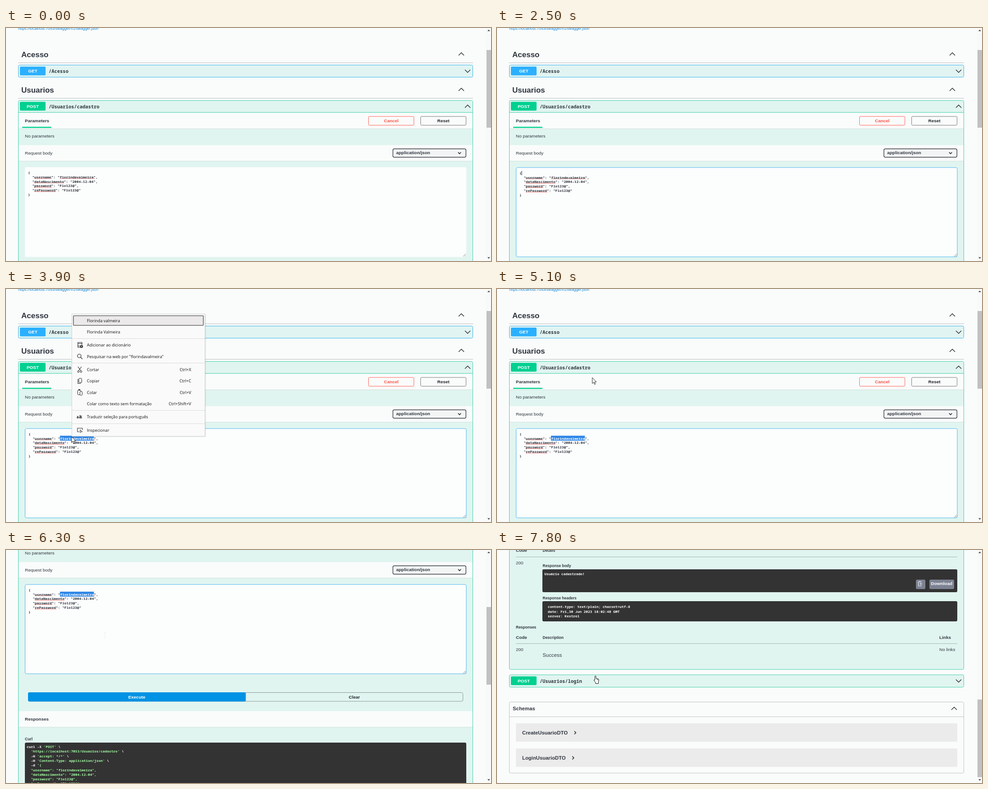
An HTML page that plays this animation: 1079 by 519 pixels, repeating every 8000 ms.

```html
<!DOCTYPE html>
<html lang="pt">
<head>
<meta charset="utf-8">
<title>Usuarios</title>
<style>
  html, body { margin: 0; width: 100%; height: 100%; overflow: hidden; background: #fafbfb; }
  svg { display: block; }
  text { white-space: pre; font: 9.95px "Liberation Sans", sans-serif; fill: #30363f; }
  .b { font-weight: 700; }
  .small { font-size: 8.5px; font-weight: 700; }
  .large { font-size: 11.35px; }
  .title { font-size: 17px; font-weight: 700; }
  .path { font: 600 10.46px "Noto Sans Mono", monospace; }
  .code { font: 600 7.83px "Noto Sans Mono", monospace; }
  .menu { font: 9.1px "Open Sans", sans-serif; fill: #111; }
  .white { fill: #fff; }
  .green { fill: #a2fca2; }
</style>
</head>
<body>
<script>
const LOOP = 8000, STEP = 100;
const INK = '#22262b', PAPER = '#fafcfb', GREEN = '#00d090', EDGE = '#3fcfaa', MINT = '#e1f5f0', BLUE = '#2bb0ff', DARK = '#333';
const CHAR = 4.7;
const USER = 'florindavalmeira';

// Drawing helpers, each returns markup
const text = (x, y, str, cls = '', extra = '') => `<text x="${x}" y="${y}" class="${cls}" ${extra}>${str}</text>`;
const centered = (x, y, str, cls = 'b', color = INK) => text(x, y, str, cls, `text-anchor="middle" style="fill:${color}"`);
const box = (x0, y0, x1, y1, fill, stroke = '', r = 0, w = 1) => {
  const i = stroke ? w / 2 : 0;
  return `<rect x="${x0 + i}" y="${y0 + i}" width="${x1 - x0 - 2 * i}" height="${y1 - y0 - 2 * i}" rx="${r}" fill="${fill}"` +
    (stroke ? ` stroke="${stroke}" stroke-width="${w}"/>` : '/>');
};
const rule = (x0, x1, y, color) => box(x0, y, x1, y + 1, color);
const line = (d, w = 1.3, color = INK) => `<path d="${d}" fill="none" stroke="${color}" stroke-width="${w}"/>`;
const chevron = (x, y, dir, s = 6, w = 1.4) => line(`M${x - s} ${y - dir * s / 2}l${s} ${dir * s} ${s} ${-dir * s}`, w);
const group = (id, content) => `<g id="${id}">${content}</g>`;

const section = (name, y) => text(34, y, name, 'title') + rule(27, 1039, y + 12, '#b9bfbf') + chevron(1013, y - 7, -1);
const route = (y, verb, path, color, dir) =>
  box(31, y + 4, 88, y + 23.5, color, '', 2) + centered(59.5, y + 17, verb, 'b', '#fff') +
  text(95, y + 18, path, 'path') + chevron(1027, y + 14, dir);
const strip = (y0, y1) => box(28, y0, 1038, y1, PAPER) + rule(28, 1038, y1, '#cfe0dc');
const codeBox = (x, y0, y1) => box(x, y0, 1024, y1, DARK, '', 3);
const squiggle = (x, y, chars) => {
  let d = `M${x} ${y}`;
  for (let i = 0; i < chars * CHAR / 3; i++) d += 'l1.5 1.2 1.5 -1.2';
  return line(d, 0.8, '#e5443c');
};

const fields = [
  `  "username": "${USER}",`, '  "dataNascimento": "2004-12-04",',
  '  "password": "Flo123@",', '  "rePassword": "Flo123@"'];

function editor() {
  const lines = ['{', ...fields, '}'];
  const words = fields.map((f, i) => squiggle(49 + 3 * CHAR, 334.5 + i * 9.8, f.indexOf('":') - 3)).join('');
  return box(42, 310, 1024, 510, '#fcfdfd', '', 3) +
    `<rect id="focus" x="42.5" y="310.8" width="981.5" height="199" rx="3" fill="none" stroke="#45b4f0"/>` +
    line('M1017 509l6-6M1020.5 509l2.5-2.5', 0.9, '#777') +
    group('json', words + squiggle(49 + 15 * CHAR, 334.5, USER.length) +
      lines.map((l, i) => text(49, 325 + i * 9.8, l, 'code')).join('') +
      group('selection', box(119, 326, 194.5, 337, '#2f86e6') + text(49 + 15 * CHAR, 334.8, USER, 'code white')) +
      group('caret', rule(53.5, 54.5, 318, INK) + box(53.5, 318, 54.5, 327, INK)));
}

function curl() {
  const lines = ["curl -X 'POST' \\", "  'https://localhost:7053/Usuarios/cadastro' \\", "  -H 'accept: */*' \\",
    "  -H 'Content-Type: application/json' \\", "  -d '{", ...fields, "}'"];
  const color = l => l.replace(/^ *[}"].*|'.*?('|$)/, '<tspan class="green">$&</tspan>');
  return text(42, 658, 'Curl', 'small') + codeBox(42, 663, 774) +
    lines.map((l, i) => text(46, 675 + i * 10.3, color(l), 'code white')).join('');
}

function response() {
  const headers = ['content-type: text/plain; charset=utf-8', 'date: Fri,30 Jun 2023 18:02:48 GMT', 'server: Kestrel'];
  return text(42, 9, 'Request URL', 'small') + codeBox(42, 14, 39) +
    text(49, 29, 'https://localhost:7053/Usuarios/cadastro', 'code white') +
    text(42, 54, 'Server response', 'small') +
    text(42, 76, 'Code', 'b') + text(101.5, 76, 'Details', 'small') + rule(42, 1024, 87, '#9fb6b0') +
    text(42, 103.5, '200') + text(101.5, 110, 'Response body', 'small') + codeBox(101, 115, 166) +
    text(105.5, 127.5, 'Usuário cadastrado!', 'code white') +
    box(932, 138, 953, 159, '#7d8293', '', 3) +
    line('M944 144.5v-1.500h-6.500v9h6.500v-1.500M939.500 142h2.500M946 147.500h-5M943 145.500l-2 2 2 2', 1, '#fff') +
    box(962, 138, 1017, 159, '#7d8293', '', 3) + centered(989.3, 150, 'Download', 'b', '#fff') +
    text(101.5, 181.5, 'Response headers', 'small') + codeBox(101, 186, 231) +
    headers.map((h, i) => text(113, 201.3 + i * 10.3, h, 'code white')).join('') +
    text(42, 246.5, 'Responses', 'small') +
    text(42, 269.5, 'Code', 'b') + text(101.5, 269.5, 'Description', 'small') + text(984, 269.5, 'Links', 'b') +
    rule(42, 1024, 280, '#9fb6b0') + text(42, 297, '200') + text(101.5, 310, 'Success', 'large') +
    text(984, 297, 'No links', '', 'font-style="italic"');
}

function schemas() {
  const model = (y, name, x) => box(42, y, 1024, y + 41, '#ebebeb', '', 2) + text(56, y + 24.5, name, 'large b') +
    line(`M${x} ${y + 17.500}l3.500 3.500-3.500 3.500`, 1.600);
  return box(27, 410, 1039, 569.5, 'none', '#bfc3c3', 3) + text(35, 428.5, 'Schemas', 'large b') +
    chevron(1017, 425, -1) + rule(27, 1039, 443, '#bfc3c3') +
    model(458, 'CreateUsuarioDTO', 172) + model(514, 'LoginUsuarioDTO', 167.5);
}

const page =
  text(27, 4, 'https://localhost:7053/swagger/v1/swagger.json', '', 'style="font-size:8.52px;fill:#0a86dc"') +
  section('Acesso', 65) + box(27, 82, 1039, 110, '#e1f4f2', '#38b2ea', 3) + route(82, 'GET', '/Acesso', BLUE, 1) +
  section('Usuarios', 144) + box(27, 161, 1039, 1118.5, MINT, EDGE, 3) +
  route(160.5, 'POST', '/Usuarios/cadastro', GREEN, -1) + rule(27, 1039, 187.5, EDGE) +
  strip(189, 224) + text(42, 210, 'Parameters', 'b') + box(36, 220, 101, 222.5, GREEN) +
  box(806, 196.5, 908, 217, 'none', '#ff6058', 2) + centered(857, 210, 'Cancel', 'b', '#ff5048') +
  box(922, 196.5, 1024, 217, 'none', '#777', 2) + centered(973, 210, 'Reset') +
  text(42, 244, 'No parameters') + strip(261, 296) + text(42, 281.5, 'Request body') +
  box(860, 268.5, 1024, 288.5, '#f3f5f5', '#3a3f45', 3, 1.4) + text(868, 281.3, 'application/json', 'b') +
  chevron(1009, 278.5, 1, 3.2, 1.5) + editor() +
  box(49, 551, 1017, 571.5, 'none', '#8a9492', 3) + box(49, 551, 533.5, 571.5, '#0092e4', '', 3) +
  centered(291, 564.5, 'Execute', 'b', '#fff') + centered(775, 564.5, 'Clear') +
  strip(593, 628) + text(42, 613.5, 'Responses', 'b') + curl() +
  `<g transform="translate(0 780)">${response()}${box(27, 349.5, 1039, 378, MINT, EDGE, 3)}` +
  route(349.5, 'POST', '/Usuarios/login', GREEN, 1) + schemas() + '</g>';

const items = [
  [70.5, 'Florinda valmeira'], [96, 'Florinda Valmeira'], [125, 'Adicionar ao dicionário'],
  [150.5, `Pesquisar na web por "${USER}"`], [180, 'Cortar', 'Ctrl+X'], [205, 'Copiar', 'Ctrl+C'],
  [230.5, 'Colar', 'Ctrl+V'], [256, 'Colar como texto sem formatação', 'Ctrl+Shift+V'],
  [285, 'Traduzir seleção para português'], [314.5, 'Inspecionar']];

const icons =
  line('M166 130h-6v-11h9v5M160 121.500h9M160 127h5', 1.200) + '<circle cx="168" cy="128" r="3.200" fill="#222"/>' +
  line('M168 126.300v3.400M166.300 128h3.400', 0.8, '#fff') +
  '<circle cx="163" cy="149" r="4" fill="none" stroke="#222" stroke-width="1.200"/>' + line('M166 152l4 4') +
  line('M160 173l6.500 9M168 173l-6.500 9', 1.100) +
  [161, 167].map(x => `<circle cx="${x}" cy="184" r="1.900" fill="none" stroke="#222"/>`).join('') +
  box(161.5, 198.5, 169, 209, 'none', '#222', 1.5) + line('M160 200.500v10h6.500', 1.100) +
  box(159, 225, 167, 236, 'none', '#222', 1) + box(161, 223.5, 165, 226, '#222') + box(164, 228, 170, 237, '#fafafa', '#222', 1) +
  text(157, 287.5, 'aあ', 'menu', 'style="font-family:Open Sans,Noto Sans CJK JP,Noto Sans CJK,sans-serif;font-weight:700;font-size:8px"') +
  line('M163 318h-4v-8h11v4', 1.100) + line('M165 313.500v6.500l2-2h3z', 1);

const menu = box(147, 57, 445, 330, '#0001', '', 2) + box(146, 55, 443, 328.5, '#fafafa', '#cfd2d2') +
  '<rect id="hover" x="150" width="289" height="21.500" rx="1" fill="#ebe9ea"/>' +
  [110, 164.5, 270, 299.5].map(y => rule(147, 442, y, '#dadada')).join('') +
  items.map(([y, label, keys = '']) => text(180, y + 3.2, label, 'menu') + text(412, y + 3.2, keys, 'menu', 'text-anchor="end"')).join('') + icons;

const cursors =
  group('arrow', '<path d="M0 0V13l3-2.800 2 4.800 2-.9-2-4.600h4.200z" fill="#fff" stroke="#111" stroke-width=".9"/>') +
  group('beam', line('M-2.500 -6.500h2l.500.500.500-.500h2M0-6V5M-2.500 5.500h2l.500-.500.500.500h2', 1, '#eff1f1')) +
  group('hand', '<path d="M-1.200 9V1.200q1.200-1.600 2.400 0V6l5 1.200q1.400.500 1.200 2L6.600 14v3.500H.3V15l-3.900-4.800q.4-1.800 2.400-.2z" fill="#fff" stroke="#111"/>' +
    line('M3.500 7v2.500M5.500 7.500v2.500', 0.8));

document.body.innerHTML = `<svg width="1079" height="519" viewBox="0 0 1079 519">
  ${box(0, 0, 1079, 519, '#fafbfb')}${group('page', page)}${group('menu', menu)}
  ${box(1068, 0, 1079, 519, '#f8f9f9')}${group('thumb', box(1069, 49, 1079, 222, '#c1c1c1'))}
  <path d="M1071 7l3-3.500 3 3.500zM1071 510.500l3 3.500 3-3.500z" fill="#505050"/>${group('cursor', cursors)}</svg>`;

const el = id => document.getElementById(id);
const show = (id, on) => el(id).setAttribute('visibility', on ? 'visible' : 'hidden');
const move = (id, x, y) => el(id).setAttribute('transform', `translate(${x} ${y})`);
const between = (t, a, b) => t >= a && t < b;

// Pointer keys: time, x, y
const pointer = [[400, 30, 3], [1000, 159, 324], [1900, 159, 332], [3800, 159, 332], [3900, 146, 329], [4000, 146, 329],
  [4100, 151, 325], [4200, 151, 325], [4800, 206, 206], [4900, 206, 206], [5300, 218, 189], [5900, 218, 189],
  [6000, 220, 191], [7200, 220, 191], [7300, 222, 232], [7400, 223, 274], [7500, 223, 274],
  [7600, 223, 293], [7700, 219, 286], [7800, 219, 280]];
// Scroll keys: time, offset
const wheel = [[0, 0], [5700, 14], [5800, 56], [5900, 78], [6000, 156], [6300, 234], [6400, 468], [6700, 780], [6900, 832], [7000, 852]];

function pointerAt(t) {
  const i = pointer.findIndex(k => k[0] > t);
  if (i < 0) return pointer.at(-1).slice(1);
  if (i === 0) return pointer[0].slice(1);
  const [t0, x0, y0] = pointer[i - 1], [t1, x1, y1] = pointer[i], p = (t - t0) / (t1 - t0);
  return [x0 + (x1 - x0) * p, y0 + (y1 - y0) * p];
}

function shape(t) {
  if (t >= 7400) return 'hand';
  if (between(t, 1900, 3900) || between(t, 6000, 7300)) return 'beam';
  return between(t, 400, 1000) || t >= 3900 ? 'arrow' : '';
}

function draw(now) {
  const t = Math.floor(now % LOOP / STEP) * STEP;
  const scroll = wheel.findLast(k => k[0] <= t)[1];
  const [x, y] = pointerAt(t), kind = shape(t), focused = t >= 1200;
  move('page', 0, -scroll);
  move('thumb', 0, scroll / 3);
  move('cursor', x, y);
  for (const id of ['arrow', 'beam', 'hand']) show(id, id === kind);

  show('focus', focused);
  move('json', focused ? 1 : 0, focused ? 0.8 : 0);
  show('selection', between(t, 1500, 2500) || t >= 3300);
  show('caret', between(t, 2500, 3000));

  const open = between(t, 3900, 5000), first = t < 4200;
  const row = first ? items[0] : items.find(item => Math.abs(item[0] - y) < 13);
  show('menu', open);
  show('hover', open && row);
  if (row) el('hover').setAttribute('y', row[0] - 11);
  el('hover').setAttribute('stroke', first ? '#666' : 'none');
  el('hover').setAttribute('stroke-width', 1.6);
}

const start = performance.now();
(function frame() {
  draw(performance.now() - start);
  requestAnimationFrame(frame);
})();
</script>
</body>
</html>
```
